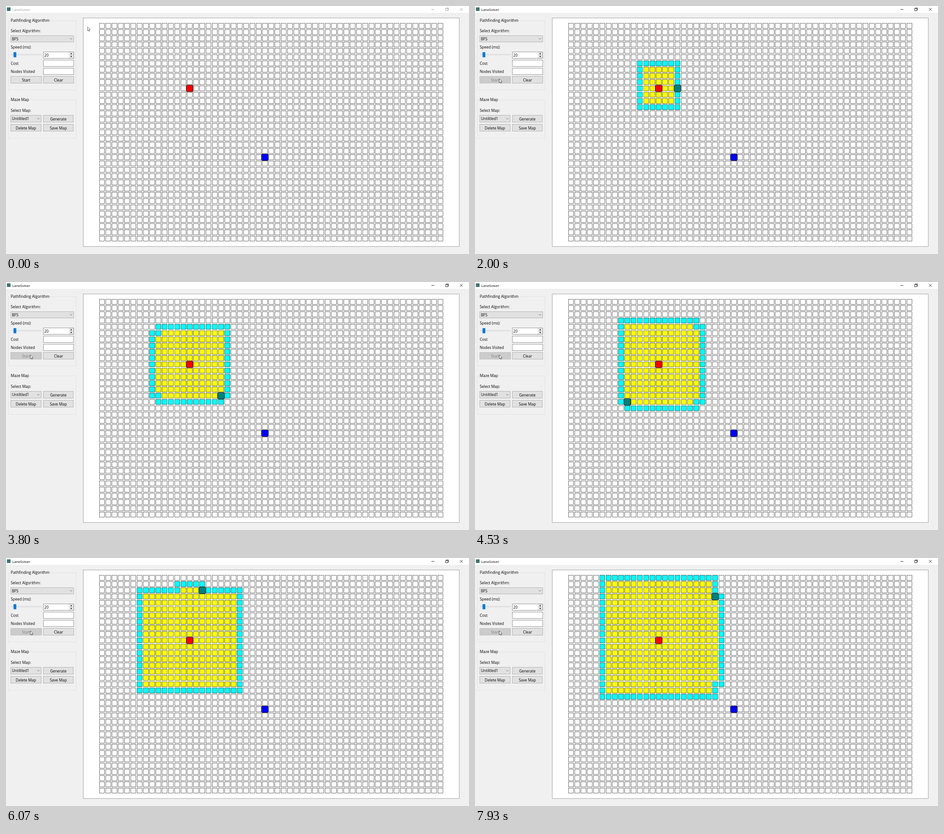
Animation of 1022x548 px, one loop 8000 ms. Source, as an HTML page with a canvas:

```html
<!DOCTYPE html>
<html lang="en">
<head>
<meta charset="utf-8">
<title>LaneSolver</title>
<style>
html, body { margin: 0; width: 100%; height: 100%; overflow: hidden; background: #f0f0f0; }
canvas { display: block; }
</style>
</head>
<body>
<canvas id="stage" width="1022" height="548"></canvas>
<script>
const ctx = document.getElementById('stage').getContext('2d');
const LOOP = 8000, TICK = 200 / 3, LAST_TICK = 119;
const CLICK_TICK = 21, MOVE_TICKS = 9, STEPS_PER_TICK = 3.25;
const COLS = 55, ROWS = 35, PITCH = 13.835, GRID_X = 211.85, GRID_Y = 43.7;
const START = { col: 14, row: 10 }, GOAL = { col: 26, row: 21 };
const UI_FONT = '8.4px "Open Sans", "Noto Sans", sans-serif';
const TITLE_FONT = '7.7px "Open Sans", "Noto Sans", sans-serif';
const FIELD_BORDER = '#989898';
const BUTTON = {
  normal: ['#e1e1e1', '#b4b4b4', '#000'],
  hover: ['#e5f1fb', '#0078d7', '#000'],
  disabled: ['#cccccc', '#bfbfbf', '#838383']
};
const CELL = {
  open: ['#fff', '#000'],
  visited: ['#ff0', '#440'],
  queued: ['#0ff', '#033']
};

// Breadth-first order: straight neighbours first, then diagonals, both clockwise.
function searchOrder(limit) {
  const dirs = [[0, -1], [1, 0], [0, 1], [-1, 0], [1, -1], [1, 1], [-1, 1], [-1, -1]];
  const queue = [{ ...START, found: -1 }];
  const seen = new Set([START.row * COLS + START.col]);
  for (let i = 0; i < limit; i++) {
    for (const [dx, dy] of dirs) {
      const col = queue[i].col + dx, row = queue[i].row + dy, id = row * COLS + col;
      if (col < 0 || row < 0 || col >= COLS || row >= ROWS || seen.has(id)) continue;
      seen.add(id);
      queue.push({ col, row, found: i });
    }
  }
  return queue;
}
const nodes = searchOrder(400);

function box(x, y, w, h, fill, stroke) {
  ctx.fillStyle = fill;
  ctx.fillRect(x, y, w, h);
  ctx.lineWidth = 1;
  ctx.strokeStyle = stroke;
  ctx.strokeRect(x + .5, y + .5, w - 1, h - 1);
}

function line(points, color, width = 1) {
  ctx.beginPath();
  points.forEach(([x, y]) => ctx.lineTo(x, y));
  ctx.strokeStyle = color;
  ctx.lineWidth = width;
  ctx.stroke();
}

function shape(points, fill) {
  ctx.beginPath();
  points.forEach(([x, y]) => ctx.lineTo(x, y));
  ctx.closePath();
  ctx.fillStyle = fill;
  ctx.fill();
}

function label(text, x, y, color = '#000', align = 'left', font = UI_FONT) {
  ctx.font = font;
  ctx.textAlign = align;
  ctx.fillStyle = color;
  ctx.fillText(text, x, y);
}

function button(text, x, y, w, state = 'normal') {
  const [fill, border, color] = BUTTON[state];
  box(x, y, w, 16, fill, border);
  label(text, x + w / 2, y + 11.6, color, 'center');
}

function combo(text, x, y, w, h) {
  box(x, y, w, h, '#e1e1e1', '#b4b4b4');
  label(text, x + 3, y + h / 2 + 3.4);
  const cx = x + w - 6.5, cy = y + h / 2;
  line([[cx - 2.5, cy - 1.3], [cx, cy + 1.2], [cx + 2.5, cy - 1.3]], '#555', .8);
}

function group(text, y, h, textWidth) {
  ctx.strokeStyle = '#e2e2e2';
  ctx.lineWidth = 1;
  ctx.strokeRect(5.5, y + .5, 149, h);
  ctx.fillStyle = '#f0f0f0';
  ctx.fillRect(9, y - 2, textWidth, 6);
  label(text, 10.5, y + 3.3);
}

function titleBar(active) {
  const color = active ? '#000' : '#999';
  ctx.fillStyle = '#fff';
  ctx.fillRect(0, 0, 1022, 15);
  ctx.fillStyle = '#41736f';
  ctx.fillRect(2, 3, 8, 8);
  label('LaneSolver', 14, 10.5, color, 'left', TITLE_FONT);
  line([[939, 7.5], [945.5, 7.5]], color, .8);
  ctx.lineWidth = .8;
  ctx.strokeRect(970.4, 5.6, 4.8, 4.8);
  line([[971.8, 5.4], [971.8, 4.3], [976.7, 4.3], [976.7, 9], [975.4, 9]], color, .8);
  line([[1002, 4.5], [1008, 10.5]], color, .8);
  line([[1008, 4.5], [1002, 10.5]], color, .8);
}

function sidePanel(startState) {
  group('Pathfinding Algorithm', 32, 153, 88);
  label('Select Algorithm:', 10.5, 57.7);
  combo('BFS', 10, 65, 140, 15);
  label('Speed (ms):', 10.5, 94);
  box(12, 106, 66, 3, '#e7eaea', '#dcdcdc');
  ctx.fillStyle = '#0078d7';
  ctx.fillRect(16.7, 102, 6, 11.3);
  box(82, 101, 68, 15, '#fff', FIELD_BORDER);
  label('20', 84.5, 111.6);
  box(139, 102, 10, 7, '#f0f0f0', '#d8d8d8');
  box(139, 108, 10, 7, '#f0f0f0', '#d8d8d8');
  shape([[141.8, 106.5], [144, 104], [146.2, 106.5]], '#000');
  shape([[141.8, 110.5], [144, 113], [146.2, 110.5]], '#000');
  label('Cost', 10.5, 129.8);
  box(82, 119, 68, 15, '#fff', FIELD_BORDER);
  label('Nodes Visited', 10.5, 148);
  box(82, 137, 68, 15, '#fff', FIELD_BORDER);
  button('Start', 10, 155, 69, startState);
  button('Clear', 82, 155, 68);

  group('Maze Map', 207, 85, 44);
  label('Select Map:', 10.5, 233.6);
  combo('Untiltled1', 10, 241, 68, 16);
  button('Generate', 82, 241, 67);
  button('Delete Map', 10, 261, 68);
  button('Save Map', 82, 261, 67);
}

function cell({ col, row }, [fill, stroke], size = 11.15, width = .58) {
  const x = GRID_X + col * PITCH - size / 2, y = GRID_Y + row * PITCH - size / 2;
  ctx.fillStyle = fill;
  ctx.fillRect(x, y, size, size);
  ctx.lineWidth = width;
  ctx.strokeStyle = stroke;
  ctx.strokeRect(x, y, size, size);
}

function bigCell(place, fill) {
  ctx.lineJoin = 'round';
  cell(place, [fill, '#000'], 14.3, .8);
  ctx.lineJoin = 'miter';
}

function grid(step) {
  box(170, 26, 831, 506, '#fff', '#a0a3a9');
  for (let row = 0; row < ROWS; row++)
    for (let col = 0; col < COLS; col++) cell({ col, row }, CELL.open);
  if (step >= 0) {
    nodes.forEach((node, i) => {
      if (node.found < step) cell(node, i < step ? CELL.visited : CELL.queued);
    });
    bigCell(nodes[step], '#008080');
  }
  bigCell(START, '#f00');
  bigCell(GOAL, '#00f');
}

function pointer(x, y) {
  const outline = [[0, 0], [0, 8.6], [2, 6.8], [3.3, 9.7], [4.7, 9.1], [3.4, 6.3], [6, 6.1]];
  const points = outline.map(([dx, dy]) => [x + dx, y + dy]);
  shape(points, '#fff');
  line([...points, points[0]], '#222', .7);
}

function draw(tick) {
  const running = tick >= CLICK_TICK;
  const step = running ? Math.floor(1.12 + (tick - CLICK_TICK) * STEPS_PER_TICK) : -1;
  const p = Math.min(tick / MOVE_TICKS, 1), ease = p * p * (3 - 2 * p);
  const x = 180 - 126.2 * ease, y = 46.3 + 114.7 * ease;
  ctx.fillStyle = '#f0f0f0';
  ctx.fillRect(0, 0, 1022, 548);
  titleBar(running);
  sidePanel(running ? 'disabled' : x < 79 && y > 155 ? 'hover' : 'normal');
  grid(step);
  pointer(x, y);
}

// Screen updates land on multiples of 10 ms.
function tickAt(time) {
  let tick = Math.min(LAST_TICK, Math.floor(time / TICK) + 1);
  while (tick > 0 && Math.round(tick * TICK / 10) * 10 > time) tick--;
  return tick;
}

let shown = -1;
function frame() {
  const tick = tickAt(performance.now() % LOOP);
  if (tick !== shown) draw(shown = tick);
  requestAnimationFrame(frame);
}
frame();
</script>
</body>
</html>
```
